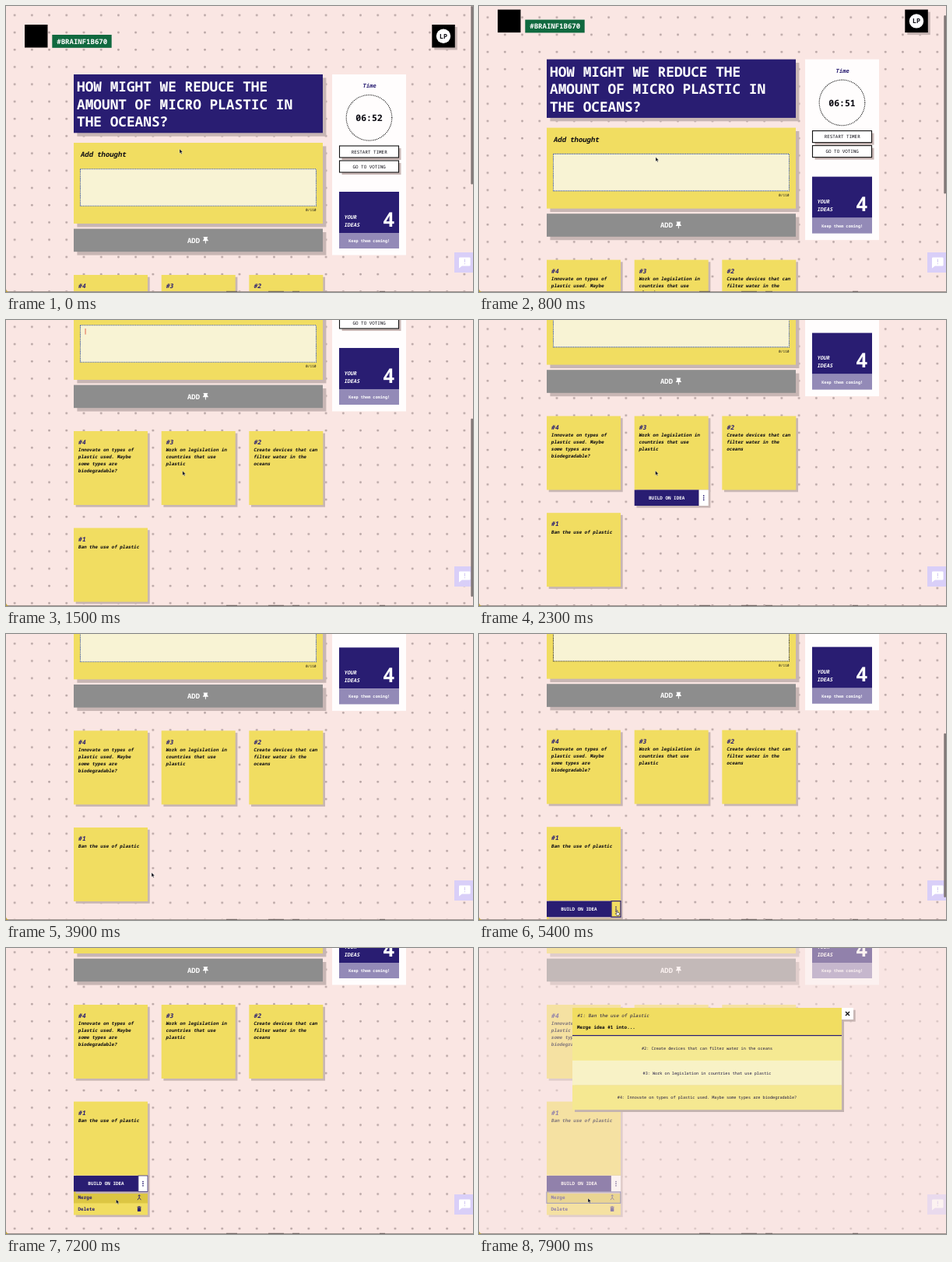
Recreate the animation shown at these times as an HTML page. Size 600 px wide and 368 px high, loop 8 s.

```html
<!DOCTYPE html>
<html lang="en">
<head>
<meta charset="utf-8">
<title>Idea board</title>
<style>
html, body { margin: 0; width: 100%; height: 100%; overflow: hidden; background: #fae6e3; }
svg { display: block; width: 600px; height: 368px; }
text { font-family: "Noto Sans Mono", "DejaVu Sans Mono", monospace; text-rendering: geometricPrecision; white-space: pre; }
</style>
</head>
<body>
<svg id="stage" viewBox="0 0 600 368" xmlns="http://www.w3.org/2000/svg"></svg>
<script>
const LOOP = 8000, VIEW = 368;
const NAVY = '#291d72', YELLOW = '#f1dd61', PINK = '#fae6e3', SHADE = '#c8b6b4';

// Markup helpers
const rect = (x, y, w, h, fill, more = '') =>
  `<rect x="${x}" y="${y}" width="${w}" height="${h}" fill="${fill}" ${more}/>`;
const raised = (x, y, w, h, fill, d = 2.7, more = '') =>
  rect(x + d, y + d, w, h, SHADE) + rect(x, y, w, h, fill, more);
const group = (id, body) => `<g id="${id}">${body}</g>`;
const text = (x, y, size, str, { fill = '#0b0a12', weight = 700, anchor = 'start', slant = 0, id = '' } = {}) =>
  `<text ${id && `id="${id}"`} transform="translate(${x} ${y}) skewX(${slant ? -11 : 0})" font-size="${size}"
    font-weight="${weight}" fill="${fill}" text-anchor="${anchor}">${str}</text>`;
const mid = { anchor: 'middle' };

function note(x, y, num, lines) {
  return raised(x, y, 95, 95, YELLOW) +
    text(x + 5.6, y + 17.2, 8, '#' + num, { fill: NAVY, slant: 1 }) +
    lines.map((s, i) => text(x + 5.6, y + 26.4 + i * 8.9, 5.95, s, { slant: 1 })).join('');
}

function dots(x, y, fill) {
  return [-2.6, 0, 2.6].map(d => `<circle cx="${x}" cy="${y + d}" r=".85" fill="${fill}"/>`).join('');
}

function actions(id, x, y) {
  return group(id,
    rect(x + 2.7, y, 95, 23, SHADE) + rect(x, y, 82.8, 20.4, NAVY) +
    `<rect id="${id}More" x="${x + 83}" y="${y}" width="12" height="20.4" fill="#fff"/>` +
    text(x + 41.5, y + 12.3, 5.95, 'BUILD ON IDEA', { ...mid, fill: '#fff' }) +
    dots(x + 89, y + 10.2, NAVY));
}

function menu() {
  const y = 586.4;
  return group('menu',
    rect(89.7, y, 95, 32.8, SHADE) + rect(87, y, 95, 30.1, YELLOW) +
    `<rect id="mergeRow" x="87" y="${y}" width="95" height="15" fill="#dcc643"/>` +
    `<rect id="deleteRow" x="87" y="${y + 15}" width="95" height="15.1" fill="#dcc643"/>` +
    text(92.5, y + 9.8, 6, 'Merge', { fill: NAVY, weight: 600 }) +
    text(92.5, y + 24.8, 6, 'Delete', { fill: NAVY, weight: 600 }) +
    `<path d="M169 ${y + 10.8}l2.2-3 2.2 3M171.2 ${y + 7.8}v-3M169.8 ${y + 5.8}l1.4-1.6 1.4 1.6" fill="none" stroke="${NAVY}" stroke-width=".9"/>` +
    `<path d="M168.6 ${y + 19.4}h1.4l.4-.6h1.4l.4.6h1.4v.9h-5zM168.9 ${y + 20.8}h4.4v4.2q0 .7-.7.7h-3q-.7 0-.7-.7z" fill="${NAVY}"/>`);
}

function panel() {
  const button = (y, s) => raised(428.5, y, 76, 15, '#fff', 3, 'stroke="#111" stroke-width="1.1"') +
    text(466.7, y + 9.6, 5.9, s, { ...mid, weight: 500 });
  return rect(419, 88, 95, 232.5, '#fffdfd') +
    text(466.7, 105.2, 7.2, 'Time', { ...mid, fill: NAVY, slant: 1 }) +
    `<circle cx="466.5" cy="143.8" r="29.3" fill="none" stroke="#111" stroke-width="1.1" stroke-dasharray="1.1 1.1"/>` +
    text(466.5, 148, 11.5, '', { ...mid, id: 'clock' }) +
    button(180, 'RESTART TIMER') + button(199, 'GO TO VOTING') +
    rect(428, 239, 77, 53, NAVY) + rect(428, 292, 77, 20, '#938ab7') +
    text(434.3, 273.7, 6.7, 'YOUR', { fill: '#fff', slant: 1 }) +
    text(434.3, 283.7, 6.7, 'IDEAS', { fill: '#fff', slant: 1 }) +
    text(499.7, 283.8, 26, '4', { fill: '#fff', anchor: 'end' }) +
    text(466.7, 304, 5.2, 'Keep them coming!', { ...mid, fill: '#fff' });
}

function page() {
  const title = ['HOW MIGHT WE REDUCE THE', 'AMOUNT OF MICRO PLASTIC IN', 'THE OCEANS?'];
  return rect(0, 0, 600, 700, 'url(#spots)') +
    rect(24, 24, 29.5, 29.5, '#000') +
    rect(59.3, 37, 76.4, 16.8, '#10693f') +
    text(97.7, 48.6, 9, '#BRAINF1B670', { ...mid, fill: '#fff' }) +
    raised(547.3, 24, 29.5, 29.5, '#000', 3) +
    `<circle cx="562" cy="38.8" r="9.2" fill="#fff"/>` + text(562, 41.8, 8.4, 'LP', mid) +
    raised(87, 88, 320, 75.3, NAVY, 4.4) +
    title.map((s, i) => text(91, 110.3 + i * 22.3, 17.78, s, { fill: '#fff' })).join('') +
    raised(87, 176, 320, 104, YELLOW, 4.4) +
    text(95.5, 194.4, 8.9, 'Add thought', { slant: 1 }) +
    `<rect id="field" x="95.5" y="209.8" width="303" height="47.5" fill="#f8f3d4" stroke-width="1.1" stroke-dasharray="1.1 1.1"/>` +
    group('caret', rect(101.6, 214, .9, 7.6, '#e0583c')) +
    text(398.6, 264.2, 4.55, '0/110', { anchor: 'end', weight: 500 }) +
    raised(87, 286.6, 320, 29.6, '#8d8d8d', 4.4) +
    text(233, 304.6, 8.9, 'ADD', { fill: '#fff' }) +
    `<path d="M253.6 297h5.6v1h-.8l.4 2.6q1.2.5 1.2 1.7h-3.1v2.6l-.5 1.2-.5-1.2v-2.6h-3.1q0-1.2 1.2-1.7l.4-2.6h-.8z" fill="#fff"/>` +
    panel() +
    note(87, 346, 4, ['Innovate on types of', 'plastic used. Maybe', 'some types are', 'biodegradable?']) +
    note(199.7, 346, 3, ['Work on legislation in', 'countries that use', 'plastic']) +
    note(312.3, 346, 2, ['Create devices that can', 'filter water in the', 'oceans']) +
    note(87, 470.6, 1, ['Ban the use of plastic']) +
    actions('bar3', 199.7, 441) + menu() + actions('bar1', 87, 566) +
    `<rect id="mergeRing" x="86.9" y="586.9" width="95" height="14.4" fill="none" stroke="#33409c" stroke-width=".9"/>`;
}

function modal() {
  const row = (y, h, fill, s) => rect(120, y, 346, h, fill) +
    text(293, y + 17.8, 5.2, s, { ...mid, weight: 400, fill: '#1c1640' });
  return group('modal',
    rect(0, 0, 600, VIEW, PINK, 'opacity=".5"') +
    rect(123, 80, 346, 131, '#c3b2b0') + rect(120, 77, 346, 36, YELLOW) +
    text(126, 89.4, 5.95, '#1: Ban the use of plastic', { slant: 1, weight: 400, fill: '#1c1640' }) +
    text(126, 104, 5.95, 'Merge idea #1 into...') +
    row(113, 32, '#f5e992', '#2: Create devices that can filter water in the oceans') +
    row(144.8, 32, '#f8f2c6', '#3: Work on legislation in countries that use plastic') +
    row(176.4, 31.8, '#f5e891', '#4: Innovate on types of plastic used. Maybe some types are biodegradable?') +
    rect(120, 112, 346, 1.2, NAVY) +
    raised(466, 77, 15, 15, '#fff') +
    `<path d="M471 82l5 5m0-5l-5 5" stroke="#111" stroke-width="1.4"/>`);
}

const stage = document.getElementById('stage');
stage.innerHTML =
  `<defs><pattern id="spots" width="22.222" height="22.222" patternUnits="userSpaceOnUse">
     <circle cx="11.1" cy="11.8" r="1.4" fill="#b7a4a3"/></pattern></defs>` +
  rect(0, 0, 600, VIEW, PINK) + group('page', page()) +
  rect(576, 317, 24, 26, '#d9cff8') +
  `<path d="M583.2 323.6h12.2q1.2 0 1.2 1.2v8.4q0 1.2-1.2 1.2h-9.6l-3.8 3v-12.6q0-1.2 1.2-1.2z" fill="#fff"/>` +
  rect(588.8, 325.6, 1.1, 4.2, '#d3c8f2') + rect(588.8, 331, 1.1, 1.2, '#d3c8f2') +
  `<rect id="thumb" x="597.3" y="0" width="2.7" height="229" rx="1.3" fill="#817877"/>` +
  modal() +
  rect(0, 367, 600, 1, '#a0938f') +
  [[283, 14], [337, 20], [368, 9], [480, 7]].map(([x, w]) => rect(x, 366.8, w, 1.2, '#6f6461')).join('') +
  `<path d="M0 364q.6 3 4 4h-4z" fill="#bda33e"/>` +
  group('arrow', `<path d="M0 0v5.6l1.3-1.2 1 2 .9-.4-.9-2h1.7z" fill="#0a0a14" stroke="#fff" stroke-width=".35"/>`) +
  group('hand', `<path d="M-.6 0q.6-.8 1.2 0v2.3l2 .5q.7.3.5 1.1l-.6 2.2h-3l-1.7-2.4q.2-.8 1-.3l.6.5z" fill="#fff" stroke="#14122a" stroke-width=".6"/>`);

const el = id => document.getElementById(id);
const show = (id, on) => el(id).setAttribute('visibility', on ? 'visible' : 'hidden');
const set = (id, name, v) => el(id).setAttribute(name, v);
const ramp = (t, a, b) => Math.min(1, Math.max(0, (t - a) / (b - a)));
const ease = (t, a, b) => { const u = ramp(t, a, b); return u * u * (3 - 2 * u); };

// time, x, y of the pointer
const PATH = [
  [0, 223, 184], [500, 227, 194.5], [2600, 226.6, 194], [3500, 189, 304], [3900, 187, 307],
  [4400, 177.5, 355.5], [5400, 177.5, 356], [6300, 176, 355.5], [6500, 176, 355.5], [7300, 140, 322], [8000, 140, 322]
];
function pointer(t) {
  const i = Math.max(1, PATH.findIndex(k => k[0] > t));
  const a = PATH[i - 1], b = PATH[i], u = ease(t, a[0], b[0]);
  return [a[1] + (b[1] - a[1]) * u, a[2] + (b[2] - a[2]) * u];
}

function draw(t) {
  const scroll = 222.4 * ease(t, 600, 1700) - .8 * ease(t, 2500, 3500) + 51.4 * ease(t, 5350, 6050);
  set('page', 'transform', `translate(0 ${-scroll})`);

  const left = 412 - Math.floor((t + 400) / 1000);
  el('clock').textContent = `0${Math.floor(left / 60)}:${String(left % 60).padStart(2, '0')}`;

  const [x, y] = pointer(t), py = y + scroll;
  const open = t >= 4500, clicked = t >= 7500;
  set('field', 'stroke', open ? '#222' : '#2f50bd');
  show('caret', !open && t % 1000 >= 50 && t % 1000 < 550);

  show('bar3', t >= 1600 && x > 199.7 && py > 346 && py < 461.4);
  show('bar1', open || (t > 3500 && x < 182));
  show('menu', open);
  const overMore = t >= 4300 && t < 5500;
  set('bar1More', 'fill', overMore ? YELLOW : '#fff');
  set('bar1More', 'stroke', open && !clicked ? NAVY : 'none');
  set('bar1More', 'stroke-width', overMore ? 1.2 : .7);

  const stale = t >= 5700 && t < 6600;
  show('mergeRow', open && (stale || (t >= 6600 && py < 601.4)));
  show('deleteRow', t >= 6600 && py >= 601.4 && py < 616.5);
  show('mergeRing', clicked);

  const full = open ? 641 : 590;
  set('thumb', 'y', scroll * VIEW / full);
  set('thumb', 'height', VIEW * VIEW / full);
  set('thumb', 'opacity', t < 5350 ? 1 - ramp(t, 2000, 2300) : 1 - ramp(t, 6500, 6800));

  set('modal', 'opacity', ramp(t, 7500, 7900));
  set('arrow', 'transform', `translate(${x} ${y})`);
  set('hand', 'transform', `translate(${x} ${y})`);
  show('arrow', !overMore);
  show('hand', overMore);
}

const start = performance.now();
function tick() {
  const t = (performance.now() - start) % LOOP;
  draw(Math.floor(t / 100) * 100);
  requestAnimationFrame(tick);
}
tick();
</script>
</body>
</html>
```
